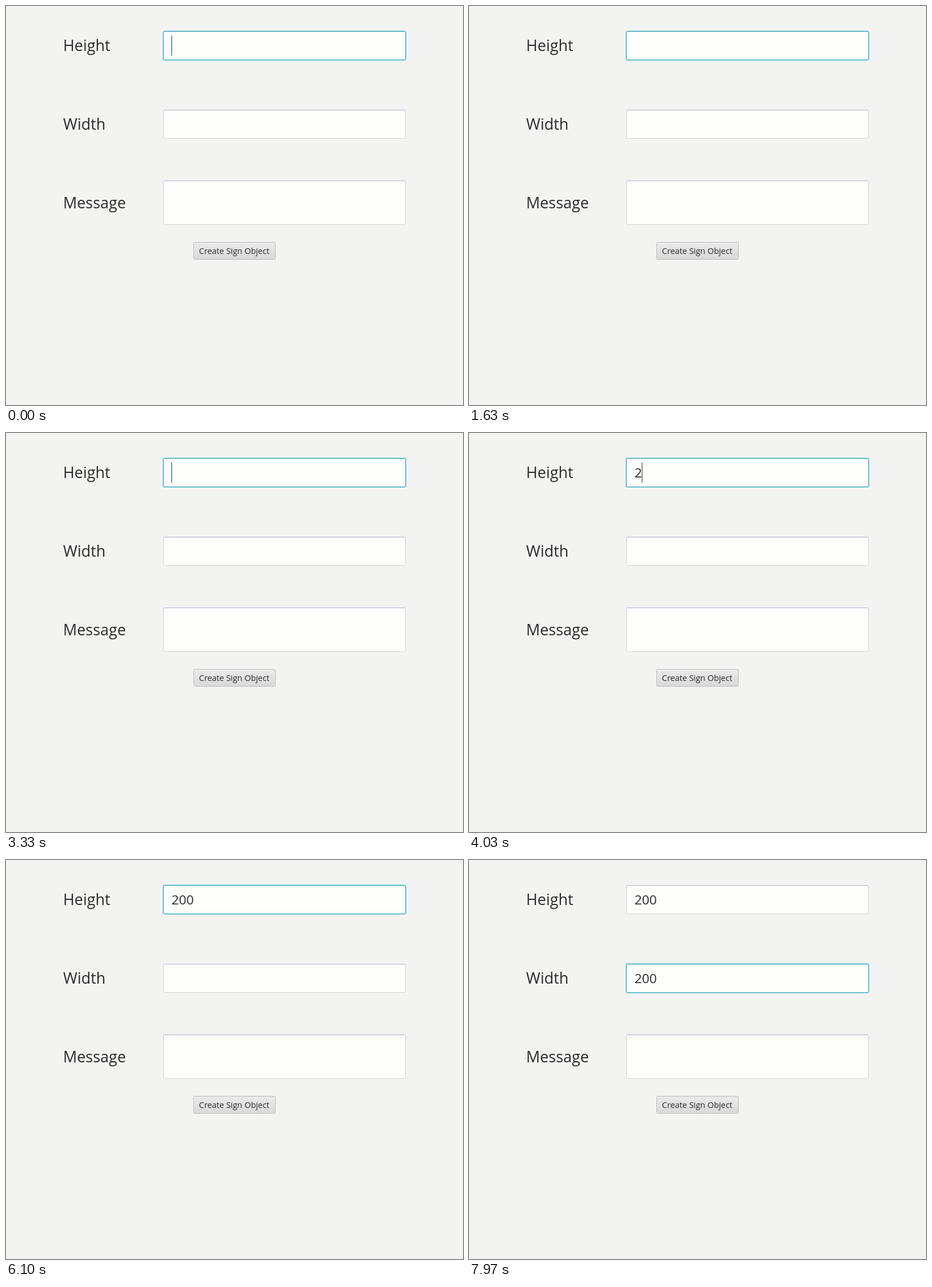
An HTML page for the animation above (8 s loop, 800 px wide and 700 px high).

```html
<!DOCTYPE html>
<html lang="en">
<head>
<meta charset="utf-8">
<title>Sign form</title>
<style>
  html, body { margin: 0; width: 100%; height: 100%; overflow: hidden; background: #f3f3f2; }
  svg { display: block; width: 800px; height: 700px; }
  text { font-family: "Open Sans", "Noto Sans", sans-serif; fill: #2b2b2b; }
  .label { font-size: 26.9px; }
  .value { font-size: 22.7px; }
  .button { font-size: 14.4px; }
</style>
</head>
<body>
<svg viewBox="0 0 800 700">
  <defs>
    <linearGradient id="edge" x2="0" y2="1">
      <stop offset="0" stop-color="#bcbcd6"/>
      <stop offset=".15" stop-color="#cfcfdc"/>
      <stop offset="1" stop-color="#d3d3d6"/>
    </linearGradient>
    <linearGradient id="face" x2="0" y2="1">
      <stop offset="0" stop-color="#ebebeb"/>
      <stop offset="1" stop-color="#d9d9d9"/>
    </linearGradient>
  </defs>
  <g id="form"></g>
  <rect x="328.5" y="414.5" width="143" height="30" rx="2" fill="url(#face)" stroke="#bababa"/>
  <text class="button" x="337.8" y="435">Create Sign Object</text>
  <rect id="caret" width="2" height="35" fill="#8f8f8a"/>
</svg>
<script>
const LOOP = 8000, BLINK = 500, DIGIT_WIDTH = 12.95;
const form = document.getElementById('form');
const caret = document.getElementById('caret');

function add(tag, attributes) {
  const node = document.createElementNS('http://www.w3.org/2000/svg', tag);
  for (const name in attributes) node.setAttribute(name, attributes[name]);
  return form.appendChild(node);
}

function makeField(name, top, height, baseline) {
  const box = { x: 275.5, y: top + .5, width: 424, height: height - 1, rx: 2.5 };
  add('text', { class: 'label', x: 100, y: baseline }).textContent = name;
  const glow = add('rect', { ...box, fill: 'none', stroke: '#a9dfe6', 'stroke-width': 3 });
  const frame = add('rect', { ...box, fill: '#fdfdfc' });
  add('rect', { x: 277, y: top + 1, width: 421, height: 1, fill: '#ececf2' });
  const value = add('text', { class: 'value', x: 289.8, y: baseline - 1 });
  return { top, glow, frame, value };
}

const fields = [
  makeField('Height', 44, 51, 79),
  makeField('Width', 182, 51, 217),
  makeField('Message', 306, 78, 355)
];

// Each input event restarts the caret's blink: time, focused field, its text.
const events = [
  [-150, 0, ''], [3900, 0, '2'], [4200, 0, '20'], [4420, 0, '200'],
  [6200, 1, ''], [6720, 1, '2'], [6970, 1, '20'], [7180, 1, '200']
];

function draw(time) {
  const past = events.filter(event => event[0] <= time);
  const [since, focus, typed] = past[past.length - 1];

  fields.forEach((field, index) => {
    const last = past.filter(event => event[1] === index).pop();
    const focused = index === focus;
    field.value.textContent = last ? last[2] : '';
    field.glow.setAttribute('visibility', focused ? 'visible' : 'hidden');
    field.frame.setAttribute('stroke', focused ? '#2ba3b5' : 'url(#edge)');
  });

  const shown = Math.floor((time - since) / BLINK) % 2 === 0;
  caret.setAttribute('visibility', shown ? 'visible' : 'hidden');
  caret.setAttribute('x', 289 + typed.length * DIGIT_WIDTH);
  caret.setAttribute('y', fields[focus].top + 8);
}

const start = performance.now();
function tick() {
  draw((performance.now() - start) % LOOP);
  requestAnimationFrame(tick);
}
tick();
</script>
</body>
</html>
```
